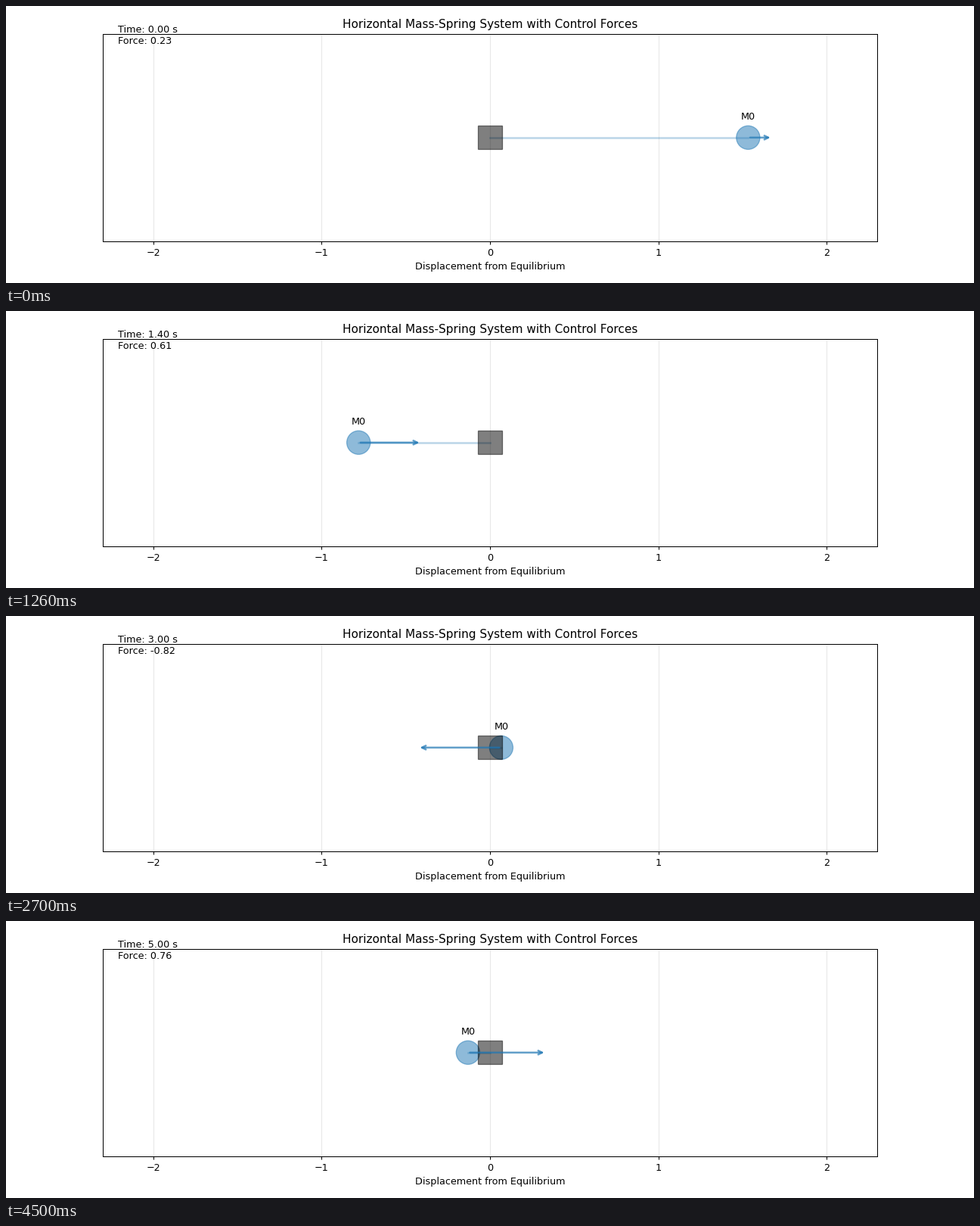
These frames come from a looping animation (1280x366 px, 4.59 s). A matplotlib script:

```python
import numpy as np
import matplotlib.pyplot as plt
from matplotlib.animation import FuncAnimation
from matplotlib.patches import Circle, FancyArrowPatch, Rectangle

W, H = 1280, 366
DPI = W / 14
FRAMES, INTERVAL, DT = 51, 90, 0.1

# mass-spring-damper driven by a sine force
MASS, DAMPING, STIFFNESS = 1.0, 0.5, 2.0
AMP, OMEGA, PHASE = 0.82, 1.44, 0.284
X0, V0 = 2.3 / 1.5, -1.976

RADIUS = 0.07
FORCE_SCALE = 0.6
BLUE = "#1f77b4"


def force(t):
    return AMP * np.sin(OMEGA * t + PHASE)


def rate(t, s):
    x, v = s
    return np.array([v, (force(t) - DAMPING * v - STIFFNESS * x) / MASS])


def simulate(substeps=10):
    """Displacement at every animation step, by RK4."""
    h = DT / substeps
    s, t, xs = np.array([X0, V0]), 0.0, [X0]
    for _ in range(FRAMES - 1):
        for _ in range(substeps):
            k1 = rate(t, s)
            k2 = rate(t + h / 2, s + h / 2 * k1)
            k3 = rate(t + h / 2, s + h / 2 * k2)
            k4 = rate(t + h, s + h * k3)
            s = s + h / 6 * (k1 + 2 * k2 + 2 * k3 + k4)
            t += h
        xs.append(s[0])
    return np.array(xs)


xs = simulate()

plt.rcParams["font.family"] = "DejaVu Sans"
# the tiny surplus keeps the pixel size from being truncated
fig = plt.figure(figsize=((W + 1e-4) / DPI, (H + 1e-4) / DPI), dpi=DPI,
                 facecolor="white")
ax = fig.add_axes([0.1, 0.15, 0.8, 0.75])
xlim = 1.5 * X0
ylim = xlim * (0.75 * H) / (0.8 * W)
ax.set(xlim=(-xlim, xlim), ylim=(-ylim, ylim), yticks=[],
       xticks=range(-2, 3), xlabel="Displacement from Equilibrium",
       title="Horizontal Mass-Spring System with Control Forces")
ax.grid(True, axis="x", alpha=0.3)
ax.set_axisbelow(True)

spring, = ax.plot([0, X0], [0, 0], color=BLUE, lw=2, alpha=0.3, zorder=2)
mass = ax.add_patch(Circle((X0, 0), RADIUS, color=BLUE, alpha=0.5, zorder=2.1))
ax.add_patch(Rectangle((-RADIUS, -RADIUS), 2 * RADIUS, 2 * RADIUS,
                       color="black", alpha=0.5, zorder=2.2))
arrow = ax.add_patch(FancyArrowPatch((X0, 0), (X0 + 0.1, 0), arrowstyle="->",
                                     mutation_scale=10, shrinkA=2, shrinkB=1,
                                     color=BLUE, lw=2, alpha=0.7, zorder=2.3))
label = ax.text(X0, 1.5 * RADIUS, "M0", ha="center")
info = ax.text(0.02, 0.95, "", transform=ax.transAxes)


def update(i):
    t, x = i * DT, xs[i]
    f = force(t)
    spring.set_data([0, x], [0, 0])
    mass.center = (x, 0)
    arrow.set_positions((x, 0), (x + FORCE_SCALE * f, 0))
    label.set_x(x)
    info.set_text(f"Time: {t:.2f} s\nForce: {f:.2f}")
    return spring, mass, arrow, label, info


anim = FuncAnimation(fig, update, frames=FRAMES, interval=INTERVAL,
                     repeat=True, repeat_delay=0, blit=False)
plt.show()
```
